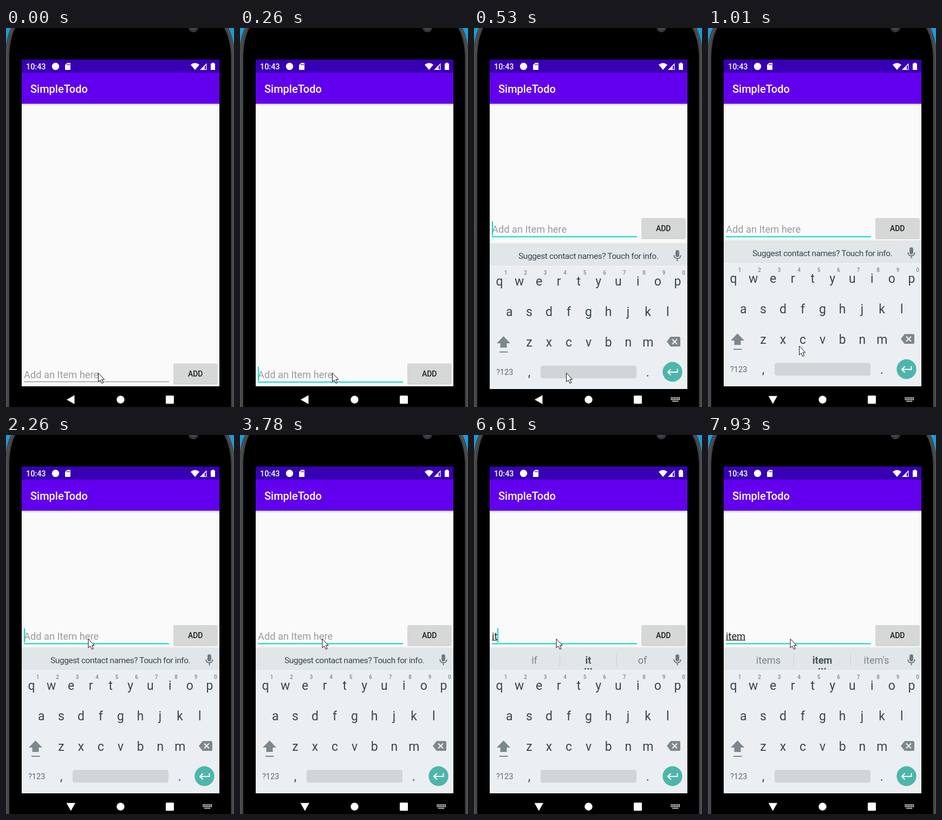
Animation, 421 px wide and 696 px high, one loop 8 s. Source, as an HTML page:

```html
<!DOCTYPE html>
<html lang="en">
<head>
<meta charset="utf-8">
<title>Todo list on a phone</title>
<style>
html, body { margin: 0; width: 100%; height: 100%; overflow: hidden; background: #000; }
svg { display: block; width: 421px; height: 696px; font-family: Roboto, sans-serif; }
.mid { text-anchor: middle; }
.medium { font-weight: 500; }
#keys text { fill: #37474f; font-size: 23px; text-anchor: middle; }
#keys .digit { fill: #7b878c; font-size: 10px; font-weight: 500; }
#words text { fill: #78848a; font-size: 18.2px; text-anchor: middle; }
#words .best { fill: #455359; font-weight: 700; }
</style>
</head>
<body>
<svg viewBox="0 0 421 696" xmlns="http://www.w3.org/2000/svg">
  <defs>
    <clipPath id="screen"><rect x="29" y="58" width="365" height="638"/></clipPath>
    <linearGradient id="fade" x2="0" y2="1">
      <stop stop-color="#000" stop-opacity="0"/>
      <stop offset="1" stop-color="#000" stop-opacity=".1"/>
    </linearGradient>
    <linearGradient id="drop" x2="0" y2="1">
      <stop stop-color="#000" stop-opacity=".2"/>
      <stop offset="1" stop-color="#000" stop-opacity="0"/>
    </linearGradient>
  </defs>

  <!-- Phone body -->
  <rect width="421" height="696" fill="#1b9bd7"/>
  <path d="M-1 696V40Q1 16 9 0H411Q419 16 422 40V696Z" fill="#424344"/>
  <path d="M1.5 696V50Q2 22 12 0M419.5 696V50Q419 22 408 0" fill="none" stroke="#565758" stroke-width="1.5"/>
  <path d="M6 696V50Q7 20 17 0H403Q414 20 415.500 50V696Z"/>
  <circle cx="346" cy="-1" r="9" fill="#36373b"/>
  <circle cx="346" cy="-1" r="5" fill="#44464d"/>

  <!-- App -->
  <rect x="29" y="139" width="365" height="519" fill="#fafafa"/>
  <rect x="29" y="139" width="365" height="4" fill="url(#drop)"/>
  <rect x="29" y="58" width="365" height="24" fill="#3700b3"/>
  <rect x="29" y="82" width="365" height="57" fill="#6200ee"/>
  <g fill="#fff">
    <text class="medium" x="37" y="75.700" font-size="14.400">10:43</text>
    <circle cx="91.500" cy="70.500" r="6.700"/>
    <path d="M113 64H118Q119 64 119 65V76Q119 77 118 77H110Q109 77 109 76V68Z"/>
    <path d="M113 66v2.500M115.200 66v2.500M117.300 66v2.500" stroke="#3700b3" stroke-width="1.100"/>
    <path d="M341 67.500Q349 61 357 67.500L349 77Z"/>
    <path d="M358 77L370.500 64.500V77ZM366.800 70.500V75.700H369.200V67.900Z" fill-rule="evenodd"/>
    <path d="M380 65.200V63.700H384V65.200H386V77H378V65.200Z"/>
    <text class="medium" x="45" y="119" font-size="20">SimpleTodo</text>
  </g>

  <g id="entry">
    <rect x="309" y="350" width="81.500" height="37.500" rx="2" fill="#000" opacity=".18"/>
    <rect x="309" y="349" width="81.500" height="37" rx="2" fill="#d6d7d7"/>
    <text class="mid medium" x="349.700" y="373" font-size="14" fill="#1c1c1c">ADD</text>
    <text id="hint" x="33" y="375.500" font-size="18.250" fill="#9b9b9b">Add an Item here</text>
    <text id="typed" x="33" y="375.500" font-size="18.250" fill="#212121"></text>
    <rect id="mark" x="33" y="376.300" height="1.200" fill="#212121"/>
    <rect id="line" x="33" width="268"/>
    <rect id="caret" y="355" width="2" height="26" fill="#03dac5"/>
  </g>

  <g clip-path="url(#screen)">
    <g id="board">
      <rect x="29" y="388" width="365" height="4" fill="url(#fade)"/>
      <rect x="29" y="392" width="365" height="266" fill="#eceff1"/>
      <rect x="29" y="392" width="365" height="40" fill="#e1e6e8"/>
      <rect x="29" y="432" width="365" height="1" fill="#f7f8f9"/>
      <text id="tip" x="82" y="419" font-size="15.500" letter-spacing="-.42" fill="#37474f">Suggest contact names? Touch for info.</text>
      <g id="words">
        <path d="M158.500 401.500V425M263.500 401.500V425" stroke="#ccd2d5"/>
        <text x="111.500" y="420"></text>
        <text class="best" x="211" y="420"></text>
        <text x="311" y="420"></text>
        <g fill="#455359">
          <circle cx="205.500" cy="429.300" r="1.500"/>
          <circle cx="210.800" cy="429.300" r="1.500"/>
          <circle cx="216.100" cy="429.300" r="1.500"/>
        </g>
      </g>
      <g stroke="#6f7b80" fill="none" stroke-width="1.900">
        <rect x="373" y="403.700" width="5" height="11" rx="2.500" fill="#6f7b80"/>
        <path d="M369.200 412Q369.500 418.300 375.500 418.300T381.800 412M375.500 418V423"/>
      </g>
      <g id="keys"></g>
      <path d="M54.500 561L67 574H60.500V582H48.500V574H42ZM47 589H62.500V591H47Z" fill="#7c888d"/>
      <path d="M363 562H378.500Q381 562 381 564.500V577.500Q381 580 378.500 580H363L356 571Z" fill="#7c888d"/>
      <path d="M366 566.500L375 575.500M375 566.500L366 575.500" stroke="#eceff1" stroke-width="2.200"/>
      <text x="41" y="632" font-size="14.500" fill="#5b686f">?123</text>
      <rect x="123" y="615" width="177" height="23.500" rx="4" fill="#d0d5d7"/>
      <circle cx="366.500" cy="626.500" r="18.200" fill="#4db6ac"/>
      <path d="M375.500 621V627H358M363.500 621.500L358 627L363.500 632.500" fill="none" stroke="#fff" stroke-width="2"/>
    </g>
  </g>

  <!-- Navigation -->
  <g fill="#fff">
    <path id="back" d="M112 682.500L126.500 674.300V690.700Z"/>
    <circle cx="211.500" cy="682.500" r="7.200"/>
    <rect x="295" y="675" width="15" height="15" rx="1.500"/>
    <path id="switch" d="M363.500 679.200H380M363.500 682.200H380M366.500 685.600H377" stroke="#fff" stroke-width="2" stroke-dasharray="2 .9"/>
  </g>
  <path id="mouse" d="M0 0V16.300L3.700 12.900L6.500 19L9.200 17.800L6.500 11.900H11.200Z" fill="#fff" stroke="#111"/>
</svg>
<script>
const LOOP = 8000;
const $ = id => document.getElementById(id);

// Each track lists [start time, value]; a value holds until the next.
const tracks = {
  focus: [[0, 0], [140, 1], [260, 2]],
  board: [[0, null], [410, [134, .5]], [530, [5, 1]], [650, [1, 1]], [770, [0, 1]]],
  turn: [[0, 0], [650, -40], [770, -75], [890, -90]],
  caret: [[0, 0], [140, 1], [770, 0], [1160, 1], [1690, 0], [2260, 1], [2690, 0], [3220, 1],
    [3780, 0], [4240, 1], [4780, 0], [5210, 1], [6340, 0], [6490, 1], [7930, 0]],
  mouse: [[0, [170.5, 633.5]], [1010, [168.5, 584]], [1160, [165, 558]], [1280, [160, 529]],
    [1430, [151, 481]], [1550, [148, 437]], [1690, [152, 374.5]]],
  typed: [[0, ""], [5610, "i"], [6490, "it"], [6730, "ite"], [7220, "item"]],
  marked: [[0, 0], [5760, 1], [6490, 2], [6730, 3], [7220, 4]],
  words: [[0, ""], [5910, "in I is"], [6610, "if it of"], [6850, "it ite its"], [7340, "items item item's"]]
};
const textEnds = [33, 37, 43, 53, 69];

function at(name, time) {
  let value;
  for (const [start, v] of tracks[name]) if (start <= time) value = v;
  return value;
}

function addKey(label, x, y, kind = "") {
  const key = document.createElementNS("http://www.w3.org/2000/svg", "text");
  key.setAttribute("x", x);
  key.setAttribute("y", y);
  key.setAttribute("class", kind);
  key.textContent = label;
  $("keys").append(key);
}

[["qwertyuiop", 47, 468], ["asdfghjkl", 65.3, 523.5], ["zxcvbnm", 102, 579.5]].forEach(([row, x, y]) =>
  [...row].forEach((letter, i) => addKey(letter, x + i * 36.55, y)));
[..."1234567890"].forEach((digit, i) => addKey(digit, 58.5 + i * 36.5, 448, "digit"));
addKey(",", 102, 635);
addKey(".", 320.7, 635);

const show = (id, on) => { $(id).style.display = on ? "" : "none"; };

function draw(time) {
  const now = {};
  for (const name in tracks) now[name] = at(name, time);

  const open = now.board !== null;
  $("entry").setAttribute("transform", `translate(0 ${open ? 0 : 267})`);
  const line = $("line");
  line.setAttribute("y", now.focus ? 382.3 : 382.2);
  line.setAttribute("height", now.focus === 2 ? 2 : now.focus ? 1.5 : 1);
  line.setAttribute("fill", now.focus ? "#03dac5" : "#777");

  show("board", open);
  show("switch", open);
  if (open) {
    $("board").setAttribute("transform", `translate(0 ${now.board[0]})`);
    $("board").setAttribute("opacity", now.board[1]);
  }
  $("back").setAttribute("transform", `rotate(${now.turn} 119.8 682.5)`);

  $("typed").textContent = now.typed;
  show("hint", !now.typed);
  $("mark").setAttribute("width", textEnds[now.marked] - 33);
  show("caret", now.caret);
  $("caret").setAttribute("x", textEnds[now.typed.length]);

  show("tip", !now.words);
  show("words", now.words);
  const words = now.words.split(" ");
  $("words").querySelectorAll("text").forEach((slot, i) => { slot.textContent = words[i] || ""; });

  $("mouse").setAttribute("transform", `translate(${now.mouse})`);
}

const began = performance.now();
function tick() {
  draw((performance.now() - began) % LOOP);
  requestAnimationFrame(tick);
}
tick();
</script>
</body>
</html>
```
